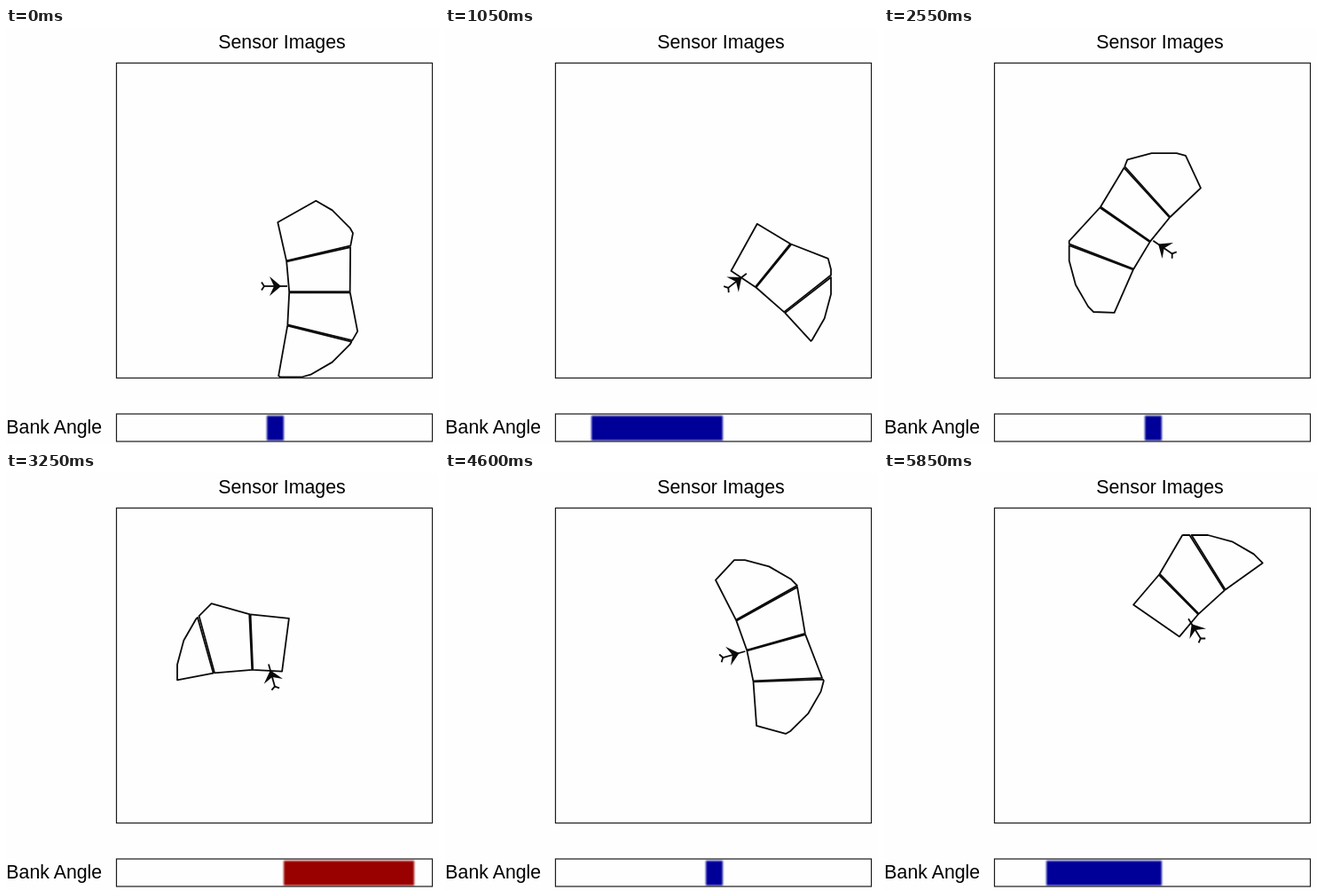
Recreate the animation shown at these times as an HTML page with a canvas. Size 488 by 470 pixels, loop 5.9 s.

```html
<!DOCTYPE html>
<html lang="en">
<head>
<meta charset="utf-8">
<title>Sensor Images</title>
<style>
  html, body { margin: 0; width: 100%; height: 100%; overflow: hidden; background: #fefefe; }
  #stage { position: relative; width: 488px; height: 470px; overflow: hidden; }
  canvas, svg { position: absolute; left: 0; top: 0; }
  text { font-family: "Liberation Sans", Arial, sans-serif; font-size: 21.33px; fill: #000; }
  rect { fill: none; stroke: #1c1c1c; stroke-width: 1.2; }
  #meter { position: absolute; left: 125px; top: 435px; width: 355px; height: 31px; overflow: hidden; }
  #bar { position: absolute; top: 2px; height: 27.5px; filter: blur(1.3px); }
</style>
</head>
<body>
<div id="stage">
  <canvas id="view" width="488" height="470"></canvas>
  <div id="meter"><div id="bar"></div></div>
  <svg width="488" height="470">
    <text x="311" y="23" text-anchor="middle">Sensor Images</text>
    <text x="0.3" y="457">Bank Angle</text>
    <rect x="124.5" y="39.5" width="356" height="355"/>
    <rect x="124.5" y="435" width="356" height="31"/>
  </svg>
</div>
<script>
const LOOP = 5900, STEP = 50;
const RAD = Math.PI / 180;
const SPEED = 0.03, TURN = 0.147;   // px per ms, degrees per ms at tan(bank) = 1
const ALTITUDE = 78, RANGE = 107, RANGE_SIDES = 24;
const PITCH = 30 * RAD, FAN = 25.5 * RAD;
const HALF_W = Math.tan(12.4 * RAD), HALF_H = Math.tan(18 * RAD);
const CELL = 4.8;                   // degrees per bar cell

// Flight plan; bank sets the turn rate, heading sets the direction of travel
const plan = [
  { t: 0, x: 302, y: 291, heading: 0, bank: 4.8 },
  { t: 1050, x: 328, y: 286, heading: 38, bank: 38 },
  { t: 1950, x: 332, y: 262, heading: 130, bank: 19 },
  { t: 3250, x: 300, y: 230, heading: 105.5, bank: -38.5 },
  { t: 4100, x: 308, y: 210, heading: 29.5, bank: -19 },
  { t: 5150, x: 341, y: 199, heading: 36, bank: 28.3 },
  { t: 5850, x: 351, y: 177, heading: 122, bank: 33.7 }
];
const rates = {
  x: p => SPEED * Math.cos(p.heading * RAD),
  y: p => -SPEED * Math.sin(p.heading * RAD),
  heading: p => TURN * Math.tan(p.bank * RAD)
};

const ctx = document.getElementById('view').getContext('2d');
const bar = document.getElementById('bar');

function poseAt(t) {
  let i = 0;
  while (i < plan.length - 2 && t >= plan[i + 1].t) i++;
  const a = plan[i], b = plan[i + 1];
  const d = b.t - a.t, u = (t - a.t) / d;
  const hermite = key => {
    const s0 = rates[key](a) * d, s1 = rates[key](b) * d, gap = b[key] - a[key];
    const c2 = 3 * gap - 2 * s0 - s1, c3 = s0 + s1 - 2 * gap;
    return {
      value: a[key] + u * (s0 + u * (c2 + u * c3)),
      rate: (s0 + u * (2 * c2 + 3 * u * c3)) / d
    };
  };
  const heading = hermite('heading');
  return {
    x: hermite('x').value,
    y: hermite('y').value,
    dir: heading.value * RAD,
    roll: Math.atan(heading.rate / TURN)
  };
}

// Keep the part of a polygon where nx*x + ny*y <= limit
function clip(poly, nx, ny, limit) {
  const out = [];
  poly.forEach((p, i) => {
    const q = poly[(i + 1) % poly.length];
    const a = nx * p[0] + ny * p[1] - limit;
    const b = nx * q[0] + ny * q[1] - limit;
    if (a <= 0) out.push(p);
    if (a * b < 0) {
      const k = a / (a - b);
      out.push([p[0] + (q[0] - p[0]) * k, p[1] + (q[1] - p[1]) * k]);
    }
  });
  return out;
}

// Ground point (forward, right) seen by a camera at image position u, v
function project(yaw, roll, u, v) {
  const lat = u * Math.cos(yaw) + Math.sin(yaw);
  const depth = Math.cos(yaw) - u * Math.sin(yaw);
  const fwd = depth * Math.sin(PITCH) + v * Math.cos(PITCH);
  const down = depth * Math.cos(PITCH) - v * Math.sin(PITCH);
  const side = lat * Math.cos(roll) + down * Math.sin(roll);
  const drop = Math.max(0.03, down * Math.cos(roll) - lat * Math.sin(roll));
  return [fwd * ALTITUDE / drop, side * ALTITUDE / drop];
}

function footprint(yaw, { x, y, dir, roll }) {
  const cos = Math.cos(dir), sin = Math.sin(dir);
  let poly = [[-1, -1], [-1, 1], [1, 1], [1, -1]].map(([u, v]) => {
    const [f, r] = project(yaw, roll, u * HALF_W, v * HALF_H);
    return [f * cos + r * sin, r * cos - f * sin];
  });
  for (let k = 0; k < RANGE_SIDES; k++) {
    const a = k * 2 * Math.PI / RANGE_SIDES;
    poly = clip(poly, Math.cos(a), Math.sin(a), RANGE);
  }
  poly = poly.map(p => [p[0] + x, p[1] + y]);
  poly = clip(poly, 1, 0, 480);
  poly = clip(poly, -1, 0, -125);
  poly = clip(poly, 0, 1, 393.5);
  return clip(poly, 0, -1, -40);
}

function trace(points) {
  ctx.beginPath();
  points.forEach(p => ctx.lineTo(p[0], p[1]));
}

function drawPlane({ x, y, dir }) {
  ctx.save();
  ctx.translate(x, y);
  ctx.rotate(-dir);
  trace([[-12, 0], [15, 0]]);
  ctx.stroke();
  trace([[-14, -4.5], [-11, 0], [-14, 4.5]]);
  ctx.stroke();
  trace([[8, 0], [-5, 11], [0, 0], [-5, -11]]);
  ctx.fill();
  ctx.restore();
}

function drawBar(roll) {
  const cells = Math.round(roll / RAD / CELL);
  const width = 18.5 * Math.max(1, Math.abs(cells));
  const right = cells < 0;
  bar.style.left = (right ? 188 : 187.5 - width) + 'px';
  bar.style.width = width - (right ? 1.5 : 0) + 'px';
  bar.style.background = right ? '#990000' : '#000099';
}

function draw(t) {
  const pose = poseAt(t);
  ctx.clearRect(0, 0, 488, 470);
  ctx.strokeStyle = ctx.fillStyle = '#0a0a0a';
  ctx.lineWidth = 1.8;
  ctx.lineJoin = 'round';
  for (let i = 0; i < 4; i++) {
    const poly = footprint((i - 1.5) * FAN, pose);
    if (poly.length < 3) continue;
    trace(poly);
    ctx.closePath();
    ctx.stroke();
  }
  drawPlane(pose);
  drawBar(pose.roll);
}

const start = performance.now();
function tick() {
  const t = (performance.now() - start) % LOOP;
  draw(Math.floor(t / STEP) * STEP);
  requestAnimationFrame(tick);
}
tick();
</script>
</body>
</html>
```
